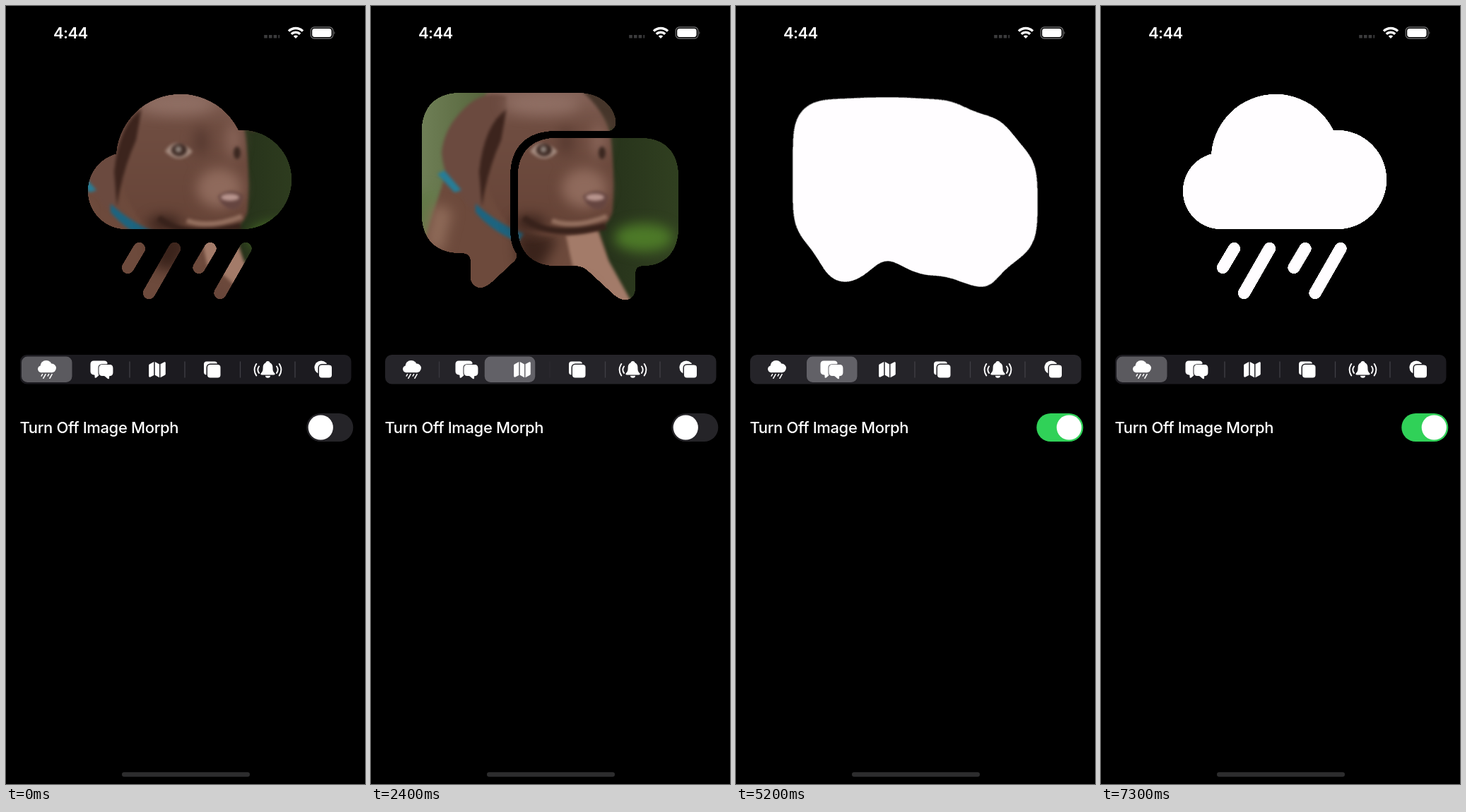
These frames come from a looping animation (508 by 1102 pixels, 7.4 s). An HTML page:

```html
<!DOCTYPE html>
<html lang="en">
<head>
<meta charset="utf-8">
<title>Shape morph</title>
<style>
  html, body { margin: 0; width: 100%; height: 100%; overflow: hidden; background: #000; }
  svg { display: block; width: 100vw; height: 100vh; }
  text { font-family: Inter, "Open Sans", sans-serif; fill: #fff; }
</style>
</head>
<body>
<svg viewBox="0 0 508 1102">
  <defs>
    <g id="cloud">
      <circle cx="170" cy="262" r="54"/>
      <circle cx="247" cy="216" r="91"/>
      <circle cx="334" cy="246" r="70"/>
      <path d="M170 230H334V316H170Z"/>
      <path d="M188.5 343.5l-16 27M238.5 343.5l-36 63M289 343.5l-16 27M339 343.5l-36 63"
        stroke="#fff" stroke-width="17" stroke-linecap="round"/>
    </g>
    <g id="bubbles">
      <path d="M127 123H292C326 123 343 143 346 161Q348 177 333 177H260C220 177 197 200 197 240V318C197 333 200 343 206 351Q207 357 203 361L172 390C165 396 159 399 154 399C146 398 141 392 141 384V362Q141 350 129 350H127C92 350 72 330 72 295V178C72 143 92 123 127 123Z"/>
      <path d="M263 187H381C416 187 435 207 435 242V313C435 348 416 368 385 368Q374 368 374 379V398C374 409 369 416 360 416C354 416 349 413 344 409L307 375Q299 368 290 368H263C228 368 208 348 208 313V242C208 207 228 187 263 187Z"/>
    </g>
    <g id="map">
      <path d="M201 149V358L147 387C134 394 122 387 122 374V203Q122 192 131 187Z"/>
      <path d="M218 147L288 188V394L218 355Z"/>
      <path d="M304 185V394L375 355Q385 349 385 338V167C385 153 373 148 361 154Z"/>
    </g>
    <filter id="goo" filterUnits="userSpaceOnUse" x="0" y="50" width="508" height="440" color-interpolation-filters="sRGB">
      <feGaussianBlur id="blur" stdDeviation="0"/>
      <feComponentTransfer><feFuncA id="cut" type="linear"/></feComponentTransfer>
    </filter>
    <filter id="soft" filterUnits="userSpaceOnUse" x="0" y="50" width="508" height="440" color-interpolation-filters="sRGB">
      <feGaussianBlur stdDeviation="2"/>
    </filter>
    <filter id="softer" filterUnits="userSpaceOnUse" x="0" y="50" width="508" height="440" color-interpolation-filters="sRGB">
      <feGaussianBlur stdDeviation="9"/>
    </filter>
    <mask id="shape" maskUnits="userSpaceOnUse" x="0" y="50" width="508" height="440" style="mask-type:alpha">
      <g filter="url(#goo)" fill="#fff"><use id="from"/><use id="to"/></g>
    </mask>
    <linearGradient id="grass">
      <stop offset=".14" stop-color="#6f7f56"/>
      <stop offset=".3" stop-color="#59683f"/>
      <stop offset=".66" stop-color="#27331b"/>
      <stop offset=".85" stop-color="#303f20"/>
    </linearGradient>
    <linearGradient id="fur" x2="0" y2="1">
      <stop offset="0" stop-color="#8c6b60"/>
      <stop offset=".3" stop-color="#6f4d41"/>
      <stop offset="1" stop-color="#664336"/>
    </linearGradient>
  </defs>

  <!-- masked picture -->
  <g mask="url(#shape)">
    <g id="photo">
      <path d="M0 50H508V490H0Z" fill="url(#grass)"/>
      <g filter="url(#softer)">
        <ellipse cx="386" cy="328" rx="42" ry="20" fill="#4d7a28"/>
        <ellipse cx="78" cy="310" rx="24" ry="50" fill="#637a48"/>
      </g>
      <g filter="url(#soft)">
        <path d="M106 238Q90 285 76 335L60 440H380L338 365L322 316L220 250Z" fill="#6d4a3c"/>
        <path d="M275 322L320 316L336 360L380 440H352Q325 385 285 368Z" fill="#a37b69"/>
      </g>
      <g filter="url(#softer)">
        <path d="M205 320L265 328L240 375L210 372Z" fill="#3a231b"/>
        <path d="M90 280L115 290L100 350L75 340Z" fill="#8f6b59"/>
        <path d="M285 385L310 395L330 440L280 430Z" fill="#68463a"/>
      </g>
      <g filter="url(#soft)">
        <path d="M162 124Q215 92 285 112Q322 132 338 178Q346 232 342 290Q337 316 300 322Q228 334 192 305Q155 262 157 180Z" fill="url(#fur)"/>
        <path d="M288 112Q350 122 352 180L337 172Q322 138 288 112Z" fill="#45352a"/>
        <path d="M192 128Q160 118 134 143Q103 172 100 208Q102 230 110 246L138 284Q158 300 158 270Q158 205 192 150Z" fill="#6b4a3f"/>
        <path d="M192 146Q160 168 153 235L157 284Q164 235 184 190Z" fill="#3c241d"/>
        <path d="M94 238L104 233L128 261L118 264Z" fill="#267d97"/>
        <path d="M148 280Q178 308 216 322L208 334Q172 320 148 292Z" fill="#1c6480"/>
      </g>
      <g filter="url(#softer)">
        <ellipse cx="302" cy="258" rx="32" ry="28" fill="#8f6a5c"/>
        <ellipse cx="242" cy="138" rx="54" ry="16" fill="#8f6e63"/>
        <ellipse cx="224" cy="308" rx="24" ry="11" fill="#38221b"/>
        <ellipse cx="276" cy="192" rx="10" ry="20" fill="#55382f"/>
        <ellipse cx="322" cy="190" rx="10" ry="26" fill="#8a665a"/>
      </g>
      <g filter="url(#soft)">
        <path d="M216 300Q250 330 332 312" fill="none" stroke="#38221b" stroke-width="9"/>
        <path d="M256 304Q288 316 334 298" fill="none" stroke="#94705f" stroke-width="7"/>
        <path d="M300 269Q318 256 335 268Q334 290 318 288Q304 284 300 269Z" fill="#654540"/>
        <ellipse cx="317" cy="271" rx="13" ry="5" fill="#b8958e"/>
        <path d="M225 206Q240 182 264 206Q246 226 225 206Z" fill="#a48b7f"/>
        <ellipse cx="245" cy="204" rx="11" ry="9" fill="#3d2a24"/>
        <circle cx="244" cy="203" r="4.5" fill="#8c8078"/>
        <ellipse cx="327" cy="208" rx="5" ry="9" fill="#3a2720"/>
      </g>
    </g>
    <path id="white" d="M0 50H508V490H0Z" fill="#fffdff"/>
  </g>

  <!-- status bar -->
  <text x="67" y="45.5" font-size="22" font-weight="600" letter-spacing="-.6">4:44</text>
  <path d="M367.5 43.3h22" stroke="#3b3b3c" stroke-width="4.5" stroke-dasharray="4.6 2.1" transform="translate(-2.3)"/>
  <g fill="none" stroke="#fff" stroke-width="3.4">
    <path d="M400 35.6a14.2 14.2 0 0 1 20 0M403.8 39.8a8.8 8.8 0 0 1 12.4 0"/>
    <path d="M410 46l-3.2-3.3a4.6 4.6 0 0 1 6.4 0Z" fill="#fff" stroke="none"/>
  </g>
  <rect x="431.2" y="30" width="31.6" height="16" rx="5" fill="none" stroke="#6b6b6c" stroke-width="1.3"/>
  <rect x="433.2" y="32" width="27.4" height="12" rx="3.4" fill="#fff"/>
  <path d="M464.4 35.5q2 2.5 0 5Z" fill="#6b6b6c"/>

  <!-- segmented control -->
  <rect id="bar" x="20" y="494" width="468.5" height="41.5" rx="9.5"/>
  <g id="rules" stroke="#414046" stroke-width="1.3"></g>
  <rect id="thumb" x="22" y="496.5" width="71.5" height="36.5" rx="8.5"/>
  <g fill="#fff">
    <use href="#cloud" transform="translate(58 515) scale(.09) translate(-260 -270)"/>
    <use href="#bubbles" transform="translate(135.5 515.3) scale(.088) translate(-254 -269)"/>
    <use href="#map" transform="translate(214 515) scale(.09) translate(-254 -270)"/>
    <rect x="280" y="503.5" width="19" height="19" rx="4"/>
    <rect class="front" x="285" y="508" width="18.5" height="18.5" rx="4"/>
    <circle cx="446" cy="512" r="9.6"/>
    <rect class="front" x="443" y="508.5" width="18" height="18" rx="4"/>
    <path d="M370.5 503c2 0 2.8 1.2 2.9 2.2c3 1.2 4 4 4 7c0 5 1 6 2.7 7.8c1 1.4 .6 2.4-.9 2.4h-17.4c-1.5 0-1.900-1-.9-2.4c1.7-1.800 2.700-2.800 2.700-7.800c0-3 1-5.800 4-7c.1-1 .9-2.200 2.900-2.200ZM367 523.800h7a3.500 3 0 0 1-7 0Z"/>
    <g id="waves" fill="none" stroke="#fff" stroke-width="1.9" stroke-linecap="round">
      <path d="M358 510.500q-3.400 4.700 0 9.400M354.300 507q-5.400 8.200 0 16.400"/>
    </g>
    <use href="#waves" transform="matrix(-1 0 0 1 741 0)"/>
  </g>

  <!-- toggle row -->
  <text x="19.4" y="605" font-size="22" font-weight="500" letter-spacing="-.35">Turn Off Image Morph</text>
  <rect id="track" x="425.3" y="577" width="66" height="40" rx="20"/>
  <circle id="knob" cy="597" r="17.6" fill="#fff"/>

  <rect x="164" y="1085.3" width="181" height="6.4" rx="3.2" fill="#2d2d2e"/>
</svg>
<script>
const LOOP = 7400, STEP = 100, MORPH = 800, DELAY = 120, MAX_BLUR = 27;
const CUTOFF = 0.3, FLIP = 3750;
const SHAPES = ["#cloud", "#bubbles", "#map"];
const TAPS = [[780, 1], [2270, 2], [4570, 1], [6180, 0]];

const $ = id => document.getElementById(id);
const set = (el, attrs) => { for (const k in attrs) el.setAttribute(k, attrs[k]); };
const clamp = v => Math.max(0, Math.min(1, v));
const mix = (a, b, p) => a + (b - a) * p;
const mixColor = (a, b, p) => `rgb(${a.map((v, i) => Math.round(mix(v, b[i], p)))})`;

// critically damped slide for the thumb and knob
const slide = ms => ms <= 0 ? 0 : ms > 380 ? 1 : 1 - (1 + ms * .022) * Math.exp(-ms * .022);
// spring with response 0.5 s and damping 0.8
const spring = ms => {
  if (ms <= 0) return 0;
  const s = ms / 1000;
  return clamp(1 - Math.exp(-10 * s) * (Math.cos(7.54 * s) + 1.333 * Math.sin(7.54 * s)));
};

const rules = [96.5, 175, 253, 331.5, 409].map(x => {
  const line = document.createElementNS("http://www.w3.org/2000/svg", "path");
  set(line, { d: `M${x} 503.5V526.5` });
  return $("rules").appendChild(line);
});
const fronts = document.querySelectorAll(".front");
const ruleShown = (i, sel) => i === sel || i + 1 === sel ? 0 : 1;

function draw(t) {
  let prev = 0, sel = 0, age = Infinity;
  for (const [at, next] of TAPS) if (t >= at) {
    prev = sel;
    sel = next;
    age = t - at;
  }

  // blur rises and falls; shapes cross-fade from its peak on
  const half = MORPH / 2, run = age - DELAY;
  const sigma = MAX_BLUR * clamp(1 - Math.abs(run - half) / half);
  const fade = age === Infinity ? 1 : spring(run - half);
  const slope = 3 + 3 * sigma;
  set($("blur"), { stdDeviation: sigma });
  set($("cut"), { slope, intercept: .5 - slope * CUTOFF });
  set($("from"), { href: SHAPES[prev], opacity: 1 - fade });
  set($("to"), { href: SHAPES[sel], opacity: fade });

  const p = age === Infinity ? 1 : slide(age), lit = age < 900;
  const barColor = lit ? "#252429" : "#1c1b20";
  set($("bar"), { fill: barColor });
  set($("thumb"), { x: 22 + 78 * mix(prev, sel, p), fill: lit ? "#626167" : "#5b5a5f" });
  rules.forEach((r, i) => set(r, { opacity: mix(ruleShown(i, prev), ruleShown(i, sel), p) }));
  fronts.forEach(f => set(f, { stroke: barColor, "stroke-width": 3, "paint-order": "stroke" }));

  const on = slide(t - FLIP);
  set($("track"), { fill: mixColor([37, 36, 40], [48, 209, 88], on) });
  set($("knob"), { cx: mix(445.3, 471.3, on) });
  $("white").style.display = t >= FLIP ? "" : "none";
  $("photo").style.display = t >= FLIP ? "none" : "";
}

const start = performance.now();
function tick() {
  const t = (performance.now() - start) % LOOP;
  draw(Math.floor(t / STEP + .1) * STEP);
  requestAnimationFrame(tick);
}
tick();
</script>
</body>
</html>
```
